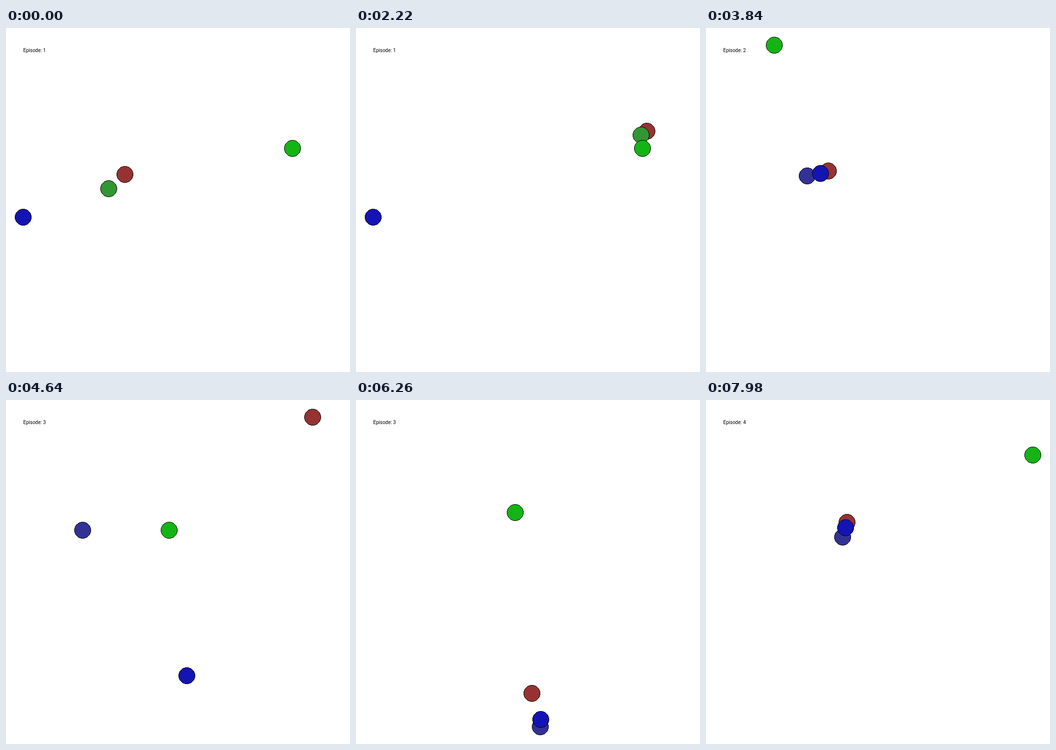
Write an HTML page that moves like this. It is 700 px wide and 700 px high and loops after 8 s.

```html
<!DOCTYPE html>
<html lang="en">
<head>
<meta charset="utf-8">
<title>Push episodes</title>
<style>
  html, body { margin: 0; width: 100%; height: 100%; overflow: hidden; background: #fff; }
  svg { display: block; width: 100%; height: 100%; }
  circle { stroke: #000; stroke-width: 1; shape-rendering: crispEdges; }
  text { font: 10px Roboto, "Liberation Sans", sans-serif; }
</style>
</head>
<body>
<svg viewBox="0 0 700 700">
  <text id="label" x="35" y="49"></text>
  <circle id="chaser" r="16.5"/>
  <circle id="agent" r="16.5"/>
  <circle id="green" r="16.5"/>
  <circle id="blue" r="16.5"/>
</svg>
<script>
const LOOP = 8000, EPISODE = 2320, FIRST = 20, STEP = 100;
const MID = 350, REACH = 315;
const DRIFT_FROM = 13, DRIFT_STEPS = 8;
const el = id => document.getElementById(id);

const colors = {
  chaser: 'rgb(150,50,50)', green: 'rgb(20,180,20)', blue: 'rgb(20,20,180)',
  agentGreen: 'rgb(50,150,50)', agentBlue: 'rgb(50,50,150)'
};

// Offsets from the stage centre; steps gives the arrival step on x and y.
const run = (from, to, steps) => ({ from, to, steps });
const episodes = [
  { goal: 'Green', green: [233.5, -104.5], blue: [-315, 35.5], drift: [7, -33],
    chaser: run([-107.5, -51.5], [235.5, -106.5], [9.5, 9.5]),
    agent: run([-140.5, -22.5], [223.5, -98.5], [13, 13]) },
  { goal: 'Blue', green: [-210.5, -315], blue: [-116.5, -53.5], drift: [-65, 4],
    chaser: run([297, -286], [-79.5, -59.5], [9.3, 15.4]),
    agent: run([126, -203], [-122.5, -49.5], [10, 10]) },
  { goal: 'Blue', green: [-26.75, -125.9], blue: [28, 315], drift: [8, 12],
    chaser: run([408.7, -469], [4.6, 253.3], [7, 10]),
    agent: run([-288.1, -125.8], [23.1, 323.7], [7, 10]) },
  { goal: 'Blue', green: [315, -237.99], blue: [-65.5, -89.99], drift: [0, 0],
    chaser: run([-178.4, -125.8], [-62.5, -100.5], [6, 6]),
    agent: run([-107.6, 318.35], [-71.5, -70.5], [8.5, 8.5]) }
];

// Distance covered from rest under constant force and 25 % damping.
const launch = k => k - 3 * (1 - 0.75 ** k);
const clamp = u => Math.max(0, Math.min(1, u));

// Each body rushes to its mark, then the touching pair drifts together.
function locate({ from, to, steps }, drift, k) {
  const u = clamp((k - DRIFT_FROM) / DRIFT_STEPS);
  const push = u * u * (3 - 2 * u);
  return from.map((start, i) => {
    const done = clamp(launch(k) / launch(steps[i]));
    return start + (to[i] - start) * done + drift[i] * push;
  });
}

function draw(t) {
  const n = Math.floor(t / EPISODE), local = t % EPISODE, ep = episodes[n];
  const k = local < FIRST ? 0 : 1 + Math.floor((local - FIRST) / STEP);
  const spots = {
    chaser: locate(ep.chaser, ep.drift, k),
    agent: locate(ep.agent, ep.drift, k),
    green: ep.green,
    blue: ep.blue
  };
  // The camera always fits the farthest body.
  const zoom = REACH / Math.max(...Object.values(spots).flat().map(Math.abs));
  const place = v => Math.floor(MID + v * zoom + 1e-6);
  for (const [id, [x, y]] of Object.entries(spots)) {
    const c = el(id);
    c.setAttribute('cx', place(x));
    c.setAttribute('cy', place(y));
    c.setAttribute('fill', colors[id === 'agent' ? id + ep.goal : id]);
  }
  el('label').textContent = `Episode: ${n + 1}`;
}

const start = performance.now();
function tick() {
  draw((performance.now() - start) % LOOP);
  requestAnimationFrame(tick);
}
tick();
</script>
</body>
</html>
```
